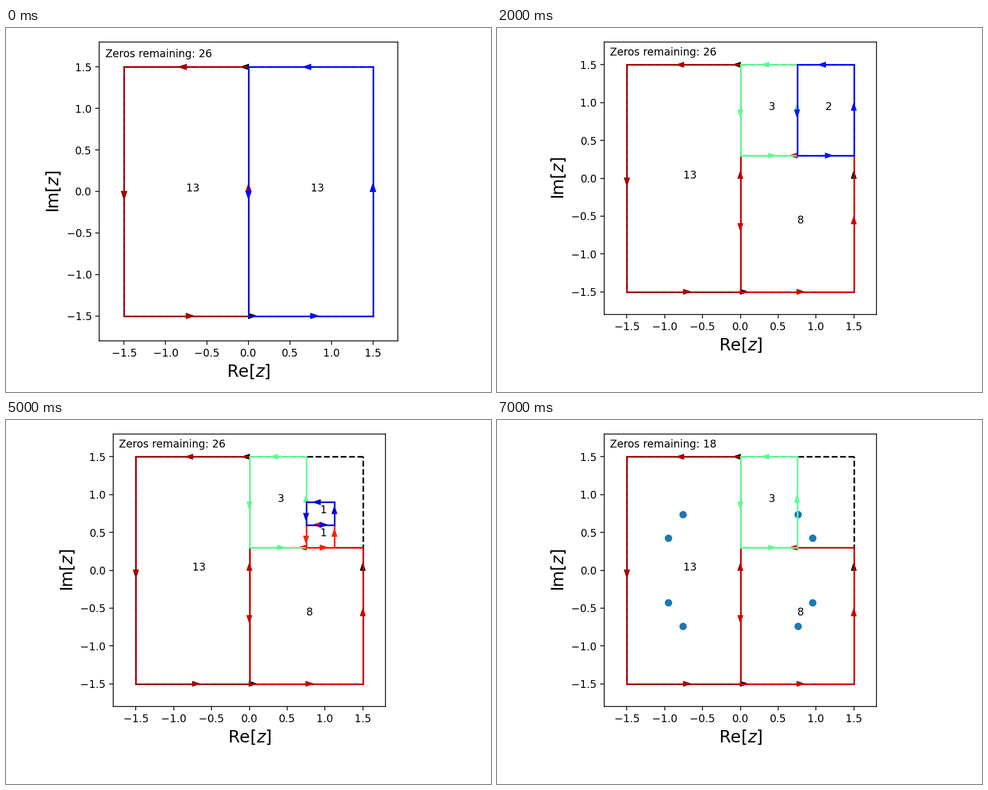
Animation of 864x648 px, one loop 8 s. Source, as a matplotlib script:

```python
import matplotlib.pyplot as plt
from matplotlib.animation import FuncAnimation
from matplotlib.ticker import MultipleLocator

W, H, DPI = 864, 648, 135
HEAD = 0.06

# name: (x0, x1, y0, y1, zero count, colour)
BOXES = {
    "left": (-1.5, 0, -1.5, 1.5, 13, "#aa0000"),
    "right": (0, 1.5, -1.5, 1.5, 13, "#0010ff"),
    "lower": (0, 1.5, -1.5, 0.3, 8, "#d40000"),
    "upper": (0, 1.5, 0.3, 1.5, 5, "#ff5500"),
    "green": (0, 0.75, 0.3, 1.5, 3, "#5fff97"),
    "tall": (0.75, 1.5, 0.3, 1.5, 2, "#0010ff"),
    "wide": (0.75, 1.5, 0.3, 0.9, 2, "#0028ff"),
    "half": (0.75, 1.125, 0.3, 0.9, 2, "#0040ff"),
    "low": (0.75, 1.125, 0.3, 0.6, 1, "#ff1e00"),
    "high": (0.75, 1.125, 0.6, 0.9, 1, "#0000d6"),
}

# active boxes and number of root families found, one entry per second
STEPS = [
    ("left right", 0),
    ("left lower upper", 0),
    ("left lower green tall", 0),
    ("left lower green wide", 0),
    ("left lower green half", 0),
    ("left lower green low high", 0),
    ("left lower green low", 1),
    ("left lower green", 2),
]
ROOTS = [(0.761, 0.738), (0.956, 0.430)]

fig = plt.figure(figsize=(W / DPI, H / DPI), dpi=DPI)
ax = fig.add_subplot()


def draw_contour(x0, x1, y0, y1, color, style="-"):
    """Anticlockwise rectangle with an arrowhead at the middle of each side."""
    corners = [(x0, y0), (x1, y0), (x1, y1), (x0, y1)]
    for (xa, ya), (xb, yb) in zip(corners, corners[1:] + corners[:1]):
        ax.plot([xa, xb], [ya, yb], color=color, linestyle=style, lw=1.5)
        length = abs(xb - xa) + abs(yb - ya)
        ax.arrow((xa + xb) / 2, (ya + yb) / 2,
                 1e-6 * (xb - xa) / length, 1e-6 * (yb - ya) / length,
                 head_width=HEAD, head_length=1.5 * HEAD,
                 fc=color, ec=color)


def place_axes(left, top, size):
    ax.set_position([left / W, 1 - (top + size) / H, size / W, size / H])
    ax.set(xlim=(-1.8, 1.8), ylim=(-1.8, 1.8))
    ax.xaxis.set_major_locator(MultipleLocator(0.5))
    ax.yaxis.set_major_locator(MultipleLocator(0.5))
    ax.set_xlabel("Re[$z$]", size=16)
    ax.set_ylabel("Im[$z$]", size=16)


def draw(step):
    ax.clear()
    names, found = STEPS[step]
    draw_contour(-1.5, 1.5, -1.5, 1.5, "k", "--")
    for name in names.split():
        x0, x1, y0, y1, count, color = BOXES[name]
        draw_contour(x0, x1, y0, y1, color)
        ax.text((x0 + x1) / 2, (y0 + y1) / 2, str(count))

    # each root comes with its mirror images in both axes
    dots = [(sx * x, sy * y) for x, y in ROOTS[:found]
            for sx in (1, -1) for sy in (1, -1)]
    if dots:
        ax.scatter(*zip(*dots), color="C0")

    ax.text(0.02, 0.95, f"Zeros remaining: {26 - len(dots)}",
            transform=ax.transAxes)
    if step == 0:
        place_axes(166, 25, 532)
    else:
        place_axes(191, 25, 485)
    return []


anim = FuncAnimation(fig, draw, frames=len(STEPS), interval=1000,
                     init_func=lambda: draw(0), repeat=True, repeat_delay=0)
plt.show()
```
